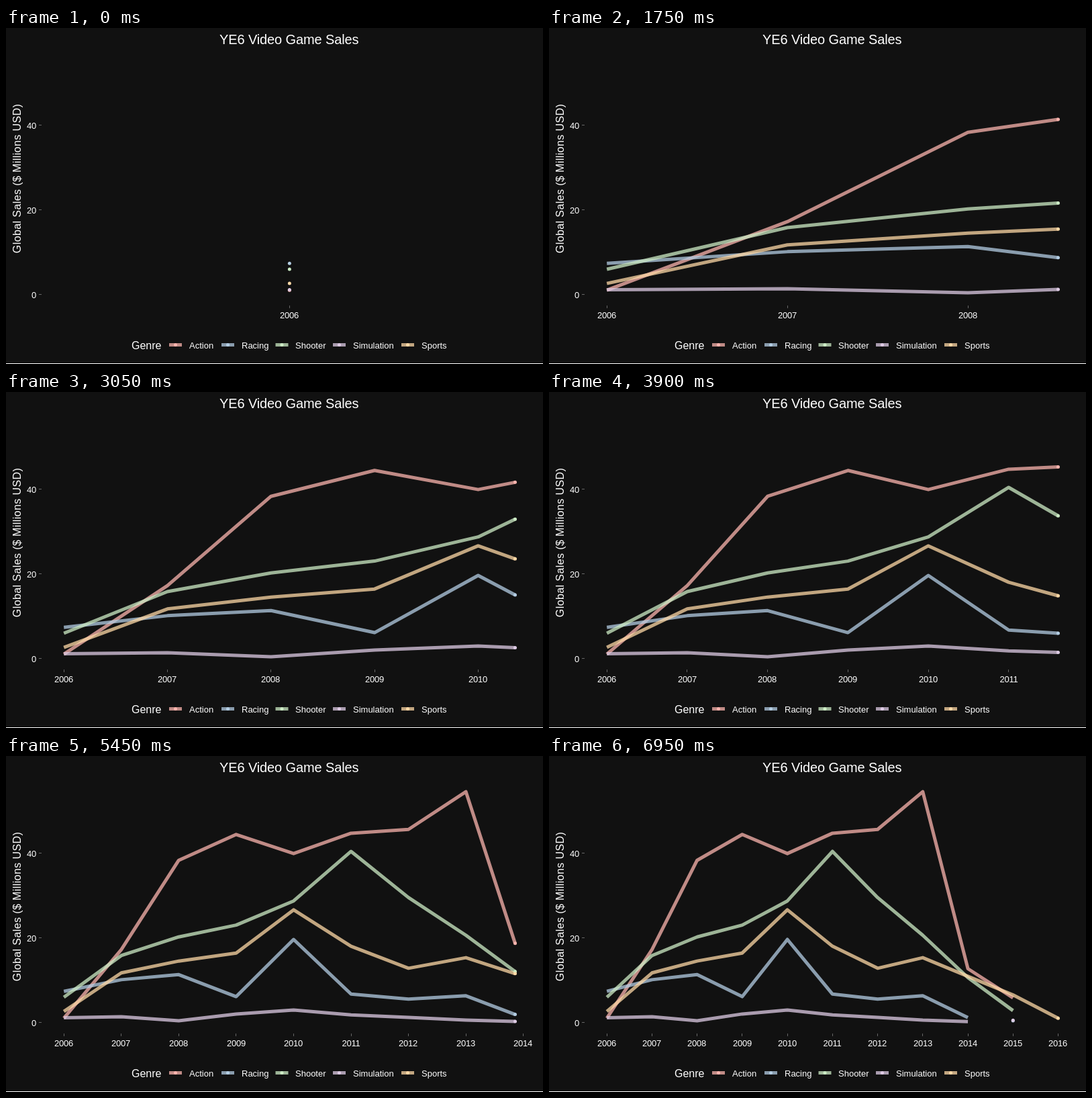
An HTML page with a canvas that plays this animation: 800 px wide and 500 px high, repeating every 10 s.

```html
<!DOCTYPE html>
<html lang="en">
<head>
<meta charset="utf-8">
<title>Video Game Sales</title>
<style>
html, body { margin: 0; width: 100%; height: 100%; overflow: hidden; background: #111; }
canvas { display: block; width: 800px; height: 500px; }
</style>
</head>
<body>
<canvas id="chart" width="800" height="500"></canvas>
<script>
const ctx = document.getElementById('chart').getContext('2d');
const FONT = '"Liberation Sans", Arial, sans-serif';
const LOOP = 10000, STEP = 50, LAST = 139;
const YEARS = 10, START = 2006;
const LEFT = 86.2, RIGHT = 758.5, PANEL_RIGHT = 792.6;
const LINE = 5, DOT = 2.5;

// Yearly sales from 2006 on; "split" series end in a lone dot in 2015.
const series = [
  { name: 'Action', color: '#fbb4ae', keyX: 243,
    sales: [1, 17.2, 38.3, 44.4, 39.9, 44.7, 45.6, 54.5, 12.7, 5.8] },
  { name: 'Racing', color: '#b3cde3', keyX: 321, split: true,
    sales: [7.35, 10.1, 11.3, 6.1, 19.6, 6.7, 5.5, 6.3, 1.15, 0.4] },
  { name: 'Shooter', color: '#ccebc5', keyX: 401.5,
    sales: [5.95, 15.8, 20.2, 23, 28.7, 40.4, 29.5, 20.6, 10.6, 2.8] },
  { name: 'Simulation', color: '#decbe4', keyX: 487, split: true,
    sales: [1.1, 1.35, 0.4, 2, 2.95, 1.8, 1.2, 0.55, 0.2, 0.5] },
  { name: 'Sports', color: '#fed9a6', keyX: 589,
    sales: [2.6, 11.7, 14.5, 16.4, 26.6, 18, 12.8, 15.3, 10.9, 6.5, 1] }
];

const yearStep = k => Math.round(k * LAST / YEARS);
const yOf = v => 396.5 - 6.3 * v;

// Years elapsed at a step; every year lands on a whole step.
function elapsed(step) {
  if (step >= LAST) return YEARS;
  let k = 0;
  while (yearStep(k + 1) <= step) k++;
  return k + (step - yearStep(k)) / (yearStep(k + 1) - yearStep(k));
}

function valueAt(sales, p) {
  const k = Math.floor(p), f = p - k;
  return f ? sales[k] + (sales[k + 1] - sales[k]) * f : sales[k];
}

function text(str, x, y, size, align = 'left', spacing = 0) {
  ctx.font = `${size}px ${FONT}`;
  ctx.letterSpacing = `${spacing}px`;
  ctx.textAlign = align;
  ctx.fillStyle = '#fff';
  ctx.fillText(str, x, y);
}

function tick(x, y, w, h) {
  ctx.fillStyle = '#666';
  ctx.fillRect(x, y, w, h);
}

function stroke(points, color) {
  ctx.globalAlpha = 0.75;
  ctx.strokeStyle = color;
  ctx.lineWidth = LINE;
  ctx.lineJoin = 'round';
  ctx.beginPath();
  points.forEach(([x, y]) => ctx.lineTo(x, y));
  ctx.stroke();
  ctx.globalAlpha = 1;
}

function dot(x, y, color) {
  ctx.fillStyle = color;
  ctx.beginPath();
  ctx.arc(x, y, DOT, 0, 2 * Math.PI);
  ctx.fill();
}

function drawFrame() {
  ctx.fillStyle = '#111';
  ctx.fillRect(0, 0, 800, 500);
  ctx.fillStyle = '#fff';
  ctx.fillRect(0, 499, 800, 1);
  text('YE6 Video Game Sales', 421.7, 24, 20, 'center', -0.12);

  ctx.save();
  ctx.translate(22, 224);
  ctx.rotate(-Math.PI / 2);
  text('Global Sales ($ Millions USD)', 0, 0, 16, 'center', 0.4);
  ctx.restore();

  for (const v of [0, 20, 40]) {
    const y = Math.floor(yOf(v));
    text(v, 45, y + 6, 13, 'right', -0.2);
    tick(49, y, 4, 1);
  }

  text('Genre', 187, 478, 16);
  for (const { name, color, keyX } of series) {
    stroke([[keyX, 471.5], [keyX + 19, 471.5]], color);
    dot(keyX + 9.5, 471.5, color);
    text(name, Math.floor(keyX) + 30, 477, 13);
  }
}

function drawAxis(xOf) {
  for (let k = 0; k <= YEARS; k++) {
    const x = xOf(k);
    if (x > PANEL_RIGHT) break;
    text(START + k, Math.floor(x + 0.2), 432, 13, 'center', -0.2);
    tick(Math.floor(x), 413, 1, 4);
  }
}

function drawSeries(p, xOf) {
  const dots = [];
  for (const { color, sales, split } of series) {
    const end = sales.length - 1;
    const done = p > end;
    const tip = Math.min(p, end);
    const lineEnd = done && split ? end - 1 : tip;
    const at = q => [xOf(q), yOf(valueAt(sales, q))];
    const points = [];
    for (let k = 0; k <= lineEnd; k++) points.push(at(k));
    if (lineEnd % 1) points.push(at(lineEnd));
    if (points.length > 1) stroke(points, color);
    if (!done || split) dots.push([...at(tip), color]);
  }
  dots.forEach(d => dot(...d));
}

function render(now) {
  const step = Math.min(LAST, Math.floor((now % LOOP) / STEP));
  const p = elapsed(step);
  const xOf = p
    ? k => LEFT + (RIGHT - LEFT) * k / p
    : k => k ? Infinity : (LEFT + RIGHT) / 2;
  drawFrame();
  drawAxis(xOf);
  drawSeries(p, xOf);
}

const began = performance.now();
function loop() {
  render(performance.now() - began);
  requestAnimationFrame(loop);
}
loop();
</script>
</body>
</html>
```
